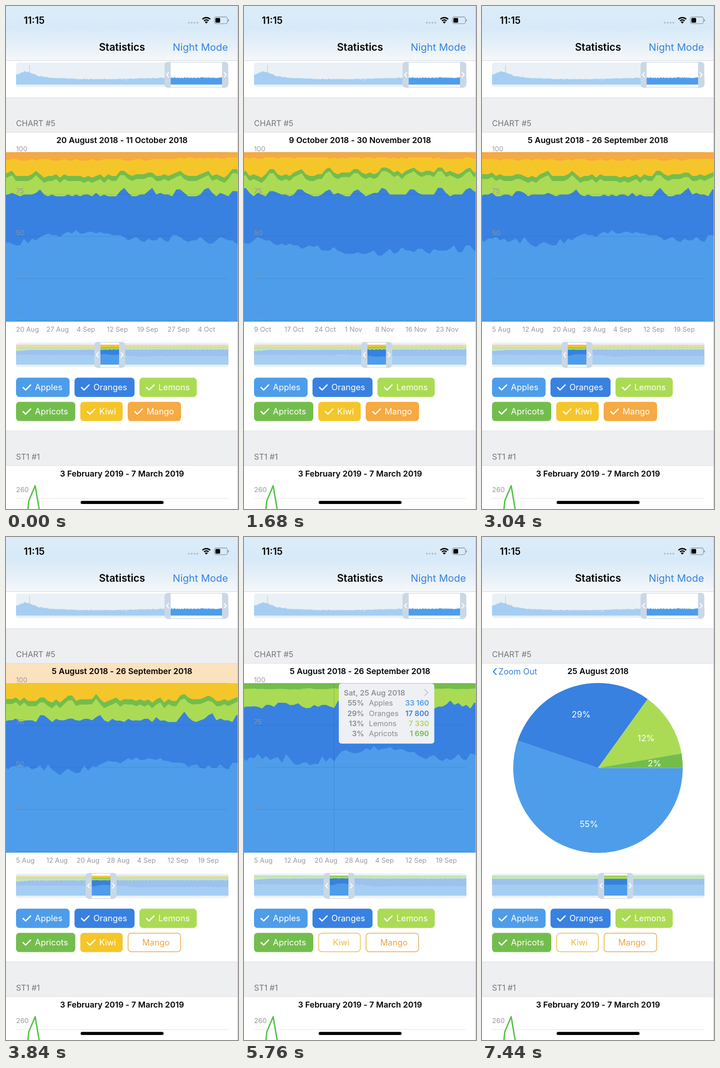
Animation, 509 px wide and 1101 px high, one loop 8000 ms. Source, as an HTML page with a canvas:

```html
<!DOCTYPE html>
<html lang="en">
<head>
<meta charset="utf-8">
<title>Statistics</title>
<style>
html, body { margin: 0; width: 100%; height: 100%; overflow: hidden; background: #fff; }
canvas { display: block; width: 509px; height: 1101px; }
</style>
</head>
<body>
<canvas id="stage"></canvas>
<script>
const W = 509, H = 1101, LOOP = 8000, TICK = 80;
const ratio = window.devicePixelRatio || 1;

function prepare(canvas) {
  canvas.width = W * ratio;
  canvas.height = H * ratio;
  const context = canvas.getContext('2d');
  context.scale(ratio, ratio);
  return context;
}
const stage = prepare(document.getElementById('stage'));
const layer = prepare(document.createElement('canvas'));
let ctx = stage;

const FRUITS = [
  { name: 'Apples', color: '#4e9dea', x: 22, y: 813.6, w: 117.5 },
  { name: 'Oranges', color: '#3881e1', x: 150.3, y: 813.6, w: 131.7 },
  { name: 'Lemons', color: '#abdb54', x: 292.8, y: 813.6, w: 125.7 },
  { name: 'Apricots', color: '#73bd4d', x: 22, y: 866.4, w: 130 },
  { name: 'Kiwi', color: '#f5c62a', ink: '#ebbb41', x: 163, y: 866.4, w: 93 },
  { name: 'Mango', color: '#f5aa42', ink: '#eaa643', x: 267, y: 866.4, w: 117 }
];
const BLUE = '#3481e2', GRAY = '#9a9a9f', HANDLE = '#cad8e6';
const MONTHS = ('January February March April May June July August ' +
  'September October November December').split(' ');

const clamp = (v, lo, hi) => Math.min(hi, Math.max(lo, v));
const mix = (a, b, k) => a + (b - a) * k;
const noise = i => Math.abs(Math.sin(i * 12.9898) * 43758.5453) % 1;

// Value at x on a line through key points, held flat beyond its ends.
function along(points, x) {
  const next = points.findIndex(p => p[0] > x);
  if (next < 0) return points[points.length - 1][1];
  if (next === 0) return points[0][1];
  const [a, b] = [points[next - 1], points[next]];
  return mix(a[1], b[1], (x - a[0]) / (b[0] - a[0]));
}

// Stepped progress: the first step is already visible at `start`.
const steps = (t, start, n) => clamp((Math.floor((t - start) / TICK) + 1) / n, 0, 1);
// Stepped progress whose first step is still unchanged.
const lateSteps = (t, start, n) => clamp(Math.floor((t - start) / TICK) / (n - 1), 0, 1);

// Slow trends by day, day 0 being 5 August; a peak comes back every weekend.
const APPLES = [[-3, 49], [8, 48], [12, 45], [24, 51], [33, 53], [45, 49], [66, 48], [88, 41], [120, 43]];
const ORANGES = [[-121, 67], [-95, 73.5], [120, 75]];
const APRICOTS = [[0, 86], [66, 86], [100, 88]];
const PEAK = [[0, 2], [21, 3], [27, 0], [36, 0.5], [42, 4]];

function weekend(d) {
  const distance = (((d - 3.1) % 7 + 7) % 7) - 3.5;
  return along(PEAK, d) * Math.exp(-distance * distance / 1.2);
}
const jitter = (d, seed, size) => (noise(d + seed) - 0.5) * 2 * size;

// Cumulative shares of a day; level 1 drops Mango, level 2 also Kiwi.
function shares(d, level) {
  const apples = Math.round(along(APPLES, d) + jitter(d, 200, 2.2));
  const oranges = Math.round(along(ORANGES, d) + weekend(d) + jitter(d, 500, 1));
  const apricots = Math.round(along(APRICOTS, d) + weekend(d) * 0.8 + jitter(d, 800, 1));
  const lemons = apricots - 3 + (apricots - 86) * 0.15;
  const kiwi = Math.round(95.5 + clamp((d - 45) / 20, 0, 1) * 1.1 + jitter(d, 900, 0.6));
  const total = level < 1 ? mix(100, kiwi, level) : mix(kiwi, apricots, level - 1);
  return [apples, oranges, lemons, apricots, kiwi, 100].map(v => Math.min(100, v / total * 100));
}

// Paints a group through the layer, so that its overlapping parts fade as one.
function faded(alpha, paint) {
  if (alpha <= 0) return;
  if (alpha >= 1) return paint();
  layer.clearRect(0, 0, W, H);
  ctx = layer;
  paint();
  ctx = stage;
  ctx.globalAlpha = alpha;
  ctx.drawImage(layer.canvas, 0, 0, W, H);
  ctx.globalAlpha = 1;
}

function text(str, x, y, size, color, align = 'left', weight = 400) {
  ctx.font = `${weight} ${size}px Inter, sans-serif`;
  ctx.textAlign = align;
  ctx.fillStyle = color;
  ctx.fillText(str, x, y + size * 0.364);
}

function rect(x, y, w, h, color) {
  ctx.fillStyle = color;
  ctx.fillRect(x, y, w, h);
}

function rounded(x, y, w, h, radius, color) {
  ctx.beginPath();
  ctx.roundRect(x, y, w, h, radius);
  ctx.fillStyle = color;
  ctx.fill();
}

function outlined(x, y, w, h, radius, color, width) {
  ctx.beginPath();
  ctx.roundRect(x, y, w, h, radius);
  ctx.strokeStyle = color;
  ctx.lineWidth = width;
  ctx.stroke();
}

function line(points, color, width) {
  ctx.beginPath();
  points.forEach(([x, y]) => ctx.lineTo(x, y));
  ctx.strokeStyle = color;
  ctx.lineWidth = width;
  ctx.lineCap = ctx.lineJoin = 'round';
  ctx.stroke();
}

const chevron = (x, y, w, h, color, width) =>
  line([[x - w / 2, y - h / 2], [x + w / 2, y], [x - w / 2, y + h / 2]], color, width);

// Stacked areas, the tallest first; xOf maps a day to a pixel.
function stack(from, to, xOf, top, bottom, sharesOf) {
  const days = [];
  for (let d = from; d <= to; d++) days.push([xOf(d), sharesOf(d)]);
  for (let i = 5; i >= 0; i--) {
    ctx.beginPath();
    ctx.moveTo(days[0][0], bottom);
    days.forEach(([x, s]) => ctx.lineTo(x, bottom - (bottom - top) * s[i] / 100));
    ctx.lineTo(days[days.length - 1][0], bottom);
    ctx.fillStyle = FRUITS[i].color;
    ctx.fill();
  }
}

function dateOf(day) {
  const date = new Date(Date.UTC(2018, 7, 5 + day));
  return { day: date.getUTCDate(), month: MONTHS[date.getUTCMonth()], year: date.getUTCFullYear() };
}
function longDate(offset) {
  const { day, month, year } = dateOf(offset);
  return `${day} ${month} ${year}`;
}
function shortDate(offset) {
  const { day, month } = dateOf(offset);
  return `${day} ${month.slice(0, 3)}`;
}

// Range selector; paint draws the miniature chart.
function selector(y, left, right, paint) {
  const shade = 'rgba(226,238,249,0.6)', edge = 13.5;
  ctx.save();
  ctx.beginPath();
  ctx.roundRect(22, y, 466, 54, 6);
  ctx.clip();
  rect(22, y, 466, 54, '#f5f7f7');
  rect(left, y, right - left, 54, '#fff');
  paint();
  rect(22, y, left + 4 - 22, 54, shade);
  rect(right - 4, y, 488 - right + 4, 54, shade);
  ctx.restore();
  for (const edgeY of [y - 1, y + 54]) rect(left + edge, edgeY, right - left - 2 * edge, 1.3, HANDLE);
  rounded(left, y - 1.2, edge, 56.6, [7, 0, 0, 7], HANDLE);
  rounded(right - edge, y - 1.2, edge, 56.6, [0, 7, 7, 0], HANDLE);
  chevron(left + edge / 2, y + 27, -4.5, 10, '#fff', 2);
  chevron(right - edge / 2, y + 27, 4.5, 10, '#fff', 2);
}

function drawHeader() {
  const sky = ctx.createLinearGradient(0, 0, 0, 120);
  sky.addColorStop(0, '#dcecf9');
  sky.addColorStop(0.4, '#d7eaf9');
  sky.addColorStop(0.68, '#e4eff8');
  sky.addColorStop(1, '#f6f8fa');
  rect(0, 0, W, 119.5, sky);
  rect(0, 119, W, 1, '#cfd2d6');
  text('11:15', 39, 31.5, 20.8, '#000', 'left', 600);
  text('Statistics', 254.5, 90, 22.5, '#000', 'center', 600);
  text('Night Mode', 487, 90, 22, BLUE, 'right');

  for (let i = 0; i < 4; i++) rounded(399 + i * 6.3, 34.5, 4.2, 4.2, 2.1, '#b3c0cc');
  const arc = [Math.PI * 1.25, Math.PI * 1.75];
  for (const radius of [12, 7.2]) {
    ctx.beginPath();
    ctx.arc(439.5, 37.5, radius, ...arc);
    ctx.strokeStyle = '#000';
    ctx.lineWidth = 2.8;
    ctx.lineCap = 'butt';
    ctx.stroke();
  }
  ctx.beginPath();
  ctx.moveTo(439.5, 38.5);
  ctx.arc(439.5, 38.5, 4.8, ...arc);
  ctx.fillStyle = '#000';
  ctx.fill();
  outlined(457.2, 24, 28.6, 14.6, 4, '#8b979f', 1.3);
  rounded(459.4, 26.2, 10.4, 10.2, 2, '#000');
  rounded(487, 29, 2, 5, [0, 2, 2, 0], '#8b979f');
}

function drawUpperSelector() {
  const profile = [[22, 150], [41, 143], [58, 148], [70, 153], [100, 157], [160, 160], [240, 160], [360, 157]];
  selector(123.5, 347.8, 487.5, () => {
    for (let x = 22; x < 488; x++) {
      const y = x === 51 ? 129 : along(profile, x) + jitter(x, 0, 1.2);
      rect(x, y, 1.05, 172 - y, FRUITS[0].color);
    }
    rect(262.7, 159, 1, 5, '#fff');
  });
}

function drawChart(off, level) {
  const start = Math.floor(off);
  stack(start - 4, start + 58, d => 22 + (d - off) * 8.79, 320, 691, d => shares(d, level));
}

function drawGrid(off, level) {
  for (let v = 0; v <= 100; v += 25) {
    const y = 688.5 - v * 3.685;
    rect(22, y - 0.5, 465.5, 1, 'rgba(24,45,59,0.13)');
    const faint = v < 50 || (v === 50 && level === 2);
    text(String(v), 22, y - 7.3, 15, `rgba(146,146,151,${faint ? 0.4 : 0.9})`);
  }
  for (let i = 0; i < 7; i++) {
    text(shortDate(Math.floor(off + 0.4 + 7.55 * i)), 22 + 66.45 * i, 707.5, 14.7, GRAY);
  }
}

function drawTooltip() {
  rect(197, 320, 1, 371, 'rgba(24,45,59,0.2)');
  rounded(208, 320.5, 209.5, 131.8, 6, '#eef0f3');
  text('Sat, 25 Aug 2018', 219, 341, 16.4, '#929297', 'left', 600);
  chevron(400, 340.5, 7, 13, '#c4c7cd', 2);
  [['55%', '33 160'], ['29%', '17 800'], ['13%', '7 330'], ['3%', '1 690']].forEach(([share, count], i) => {
    const y = 363.5 + i * 22.2;
    text(share, 263.5, y, 16.2, '#8a8a90', 'right', 600);
    text(FRUITS[i].name, 274, y, 16.2, '#8a8a90');
    text(count, 406, y, 16.2, FRUITS[i].color, 'right', 600);
  });
}

function drawPie() {
  const ends = [360, 161.3, 54.2, 9.8, 0];
  for (let i = 0; i < 4; i++) {
    ctx.beginPath();
    ctx.moveTo(254.5, 505.5);
    ctx.arc(254.5, 505.5, 186, -ends[i] * Math.PI / 180, -ends[i + 1] * Math.PI / 180);
    ctx.fillStyle = FRUITS[i].color;
    ctx.fill();
  }
}

function drawPieLabels() {
  [['55%', 234.5, 628], ['29%', 217.5, 388], ['12%', 360, 440], ['2%', 378.5, 495]]
    .forEach(([label, x, y]) => text(label, x, y, 18.7, '#fff', 'center'));
}

function drawChip({ name, color, ink, x, y, w }, on) {
  if (on) {
    rounded(x, y, w, 42.2, 7.5, color);
    line([[x + 15.5, y + 21.3], [x + 21, y + 26.8], [x + 32, y + 15.8]], '#fff', 2.8);
    text(name, x + 41.5, y + 21.2, 18.4, '#fff');
  } else {
    outlined(x + 0.8, y + 0.8, w - 1.6, 40.6, 7, ink, 1.5);
    text(name, x + 32, y + 21.2, 18.4, ink);
  }
}

function draw(t) {
  const off = t < 2800 ? mix(15, 65.1, steps(t, 1360, 5)) : mix(65.1, 0, steps(t, 2800, 4));
  const level = t < 3680 ? 0 : t < 4800 ? 1 : 2;
  const zoomed = t >= 7200;
  const chartAlpha = zoomed ? 0.8 * (1 - lateSteps(t, 7200, 4)) : 1;

  rect(0, 0, W, H, '#fff');
  for (const y of [200, 929.5]) {
    rect(0, y, W, 77, '#dcdde0');
    rect(0, y + 1, W, 75, '#eeeff1');
  }
  drawHeader();
  drawUpperSelector();
  text('CHART #5', 22, 257, 17.4, '#75757a');

  if (zoomed) drawPie();
  faded(chartAlpha, () => {
    drawChart(off, level);
    if (zoomed) drawTooltip();
  });
  if (zoomed) {
    drawPieLabels();
    chevron(28, 294.5, -6.5, 13, BLUE, 2.2);
    text('Zoom Out', 36, 294.5, 18.2, BLUE);
  } else {
    // The series just removed slides out above the plot and fades.
    const [removed, since] = level === 1 ? [FRUITS[5], 3680] : [FRUITS[4], 4800];
    if (level) faded(1 - lateSteps(t, since, 4), () => rect(0, 277, W, 43, removed.color));
    drawGrid(off, level);
    faded(steps(t, 5520, 4), drawTooltip);
  }
  const first = Math.floor(off);
  const title = zoomed ? longDate(20) : `${longDate(first)} - ${longDate(first + 52)}`;
  text(title, 254.5, 294, 17.8, '#000', 'center', 600);

  const miniLevel = lateSteps(t, 3680, 4) + lateSteps(t, 4800, 4);
  const left = zoomed ? 254.5 : 174.7 + off * 1.268;
  selector(736.5, left, zoomed ? 332 : left + 67.8, () => {
    if (zoomed) stack(0, 1, d => 22 + d * 466, 741.5, 785, () => [55, 84.5, 97, 100, 100, 100]);
    faded(chartAlpha, () =>
      stack(-121, 247, d => 22 + (d + 120.4) * 1.268, 741.5, 785, d => shares(d, miniLevel)));
  });

  FRUITS.forEach((fruit, i) => drawChip(fruit, i + level < 6));

  text('ST1 #1', 22, 986.5, 17.4, '#75757a');
  text('3 February 2019 - 7 March 2019', 254.5, 1023.5, 17.8, '#000', 'center', 600);
  text('260', 22, 1059, 15, GRAY);
  rect(22, 1077.5, 465.5, 1, '#e1e2e4');
  line([[48, 1103], [50, 1083], [64, 1050], [73, 1103]], '#51c342', 3);
  rounded(163.7, 1083.3, 182, 6.8, 3.4, '#000');
  rect(508, 0, 1, H, '#86f06a');
}

function frame() {
  draw(performance.now() % LOOP);
  requestAnimationFrame(frame);
}
frame();
</script>
</body>
</html>
```
